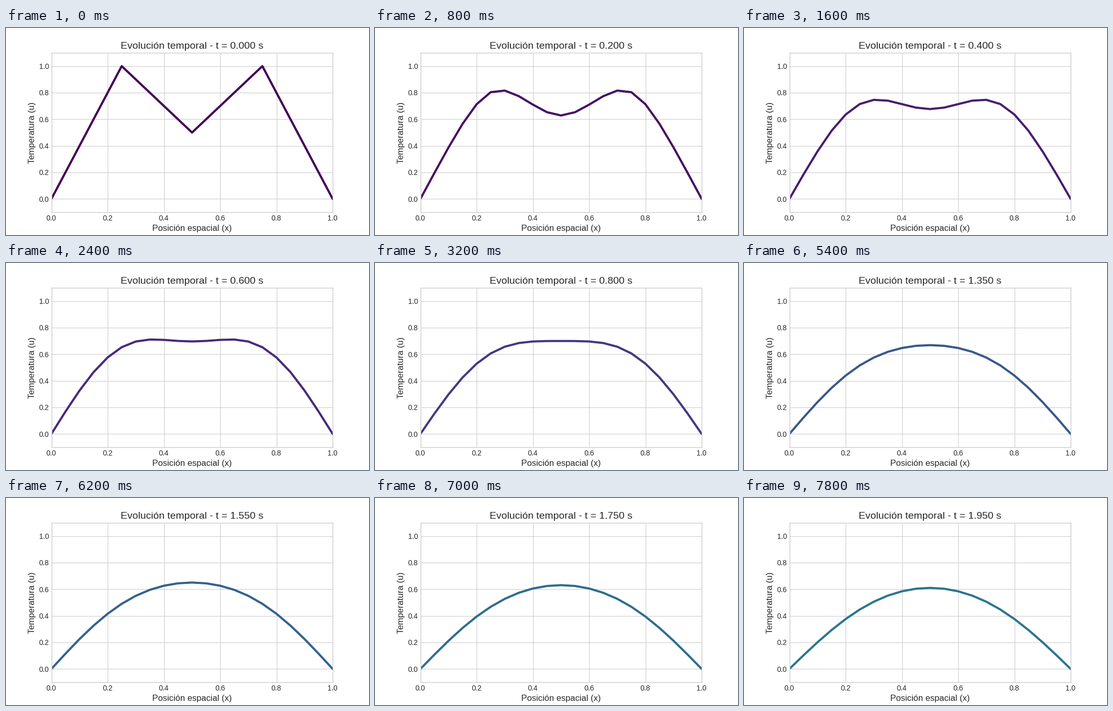
A matplotlib script that plays this animation: 700x400 px, repeating every 8 s.

```python
import numpy as np
import matplotlib.pyplot as plt
from matplotlib.animation import FuncAnimation

DARK, LIGHT = "0.15", "0.8"
plt.rcParams.update({
    "font.family": "Liberation Sans",
    "text.color": DARK, "axes.labelcolor": DARK,
    "xtick.color": DARK, "ytick.color": DARK,
    "xtick.major.size": 0, "ytick.major.size": 0,
    "axes.edgecolor": LIGHT, "axes.linewidth": 1, "axes.axisbelow": True,
    "axes.grid": True, "grid.color": LIGHT, "grid.linestyle": "-",
    "lines.solid_capstyle": "round",
})

ALPHA, DT, POINTS = 0.02, 0.05, 21
FRAMES, TOTAL_STEPS = 40, 100

x = np.linspace(0, 1, POINTS)


def solve_heat():
    """Implicit Euler for u_t = ALPHA * u_xx with both ends held at zero."""
    r = ALPHA * DT / (x[1] - x[0]) ** 2
    inner = POINTS - 2
    matrix = ((1 + 2 * r) * np.eye(inner)
              - r * (np.eye(inner, k=1) + np.eye(inner, k=-1)))
    u = np.interp(x, [0, 0.25, 0.5, 0.75, 1], [0, 1, 0.5, 1, 0])
    states = [u]
    for _ in range(FRAMES - 1):
        u = u.copy()
        u[1:-1] = np.linalg.solve(matrix, u[1:-1])
        states.append(u)
    return states


states = solve_heat()

fig, ax = plt.subplots(figsize=(7, 4), dpi=100)
line, = ax.plot(x, states[0], lw=3)
ax.set_xlim(0, 1)
ax.set_ylim(-0.1, 1.1)
ax.set_xlabel("Posición espacial (x)", fontsize=12)
ax.set_ylabel("Temperatura (u)", fontsize=12)
title = ax.set_title("", fontsize=14)


def update(i):
    line.set_ydata(states[i])
    line.set_color(plt.cm.viridis(i / TOTAL_STEPS))
    title.set_text(f"Evolución temporal - t = {i * DT:.3f} s")
    return line, title


anim = FuncAnimation(fig, update, frames=FRAMES, interval=200,
                     repeat=True, repeat_delay=0, blit=False)
plt.show()
```
